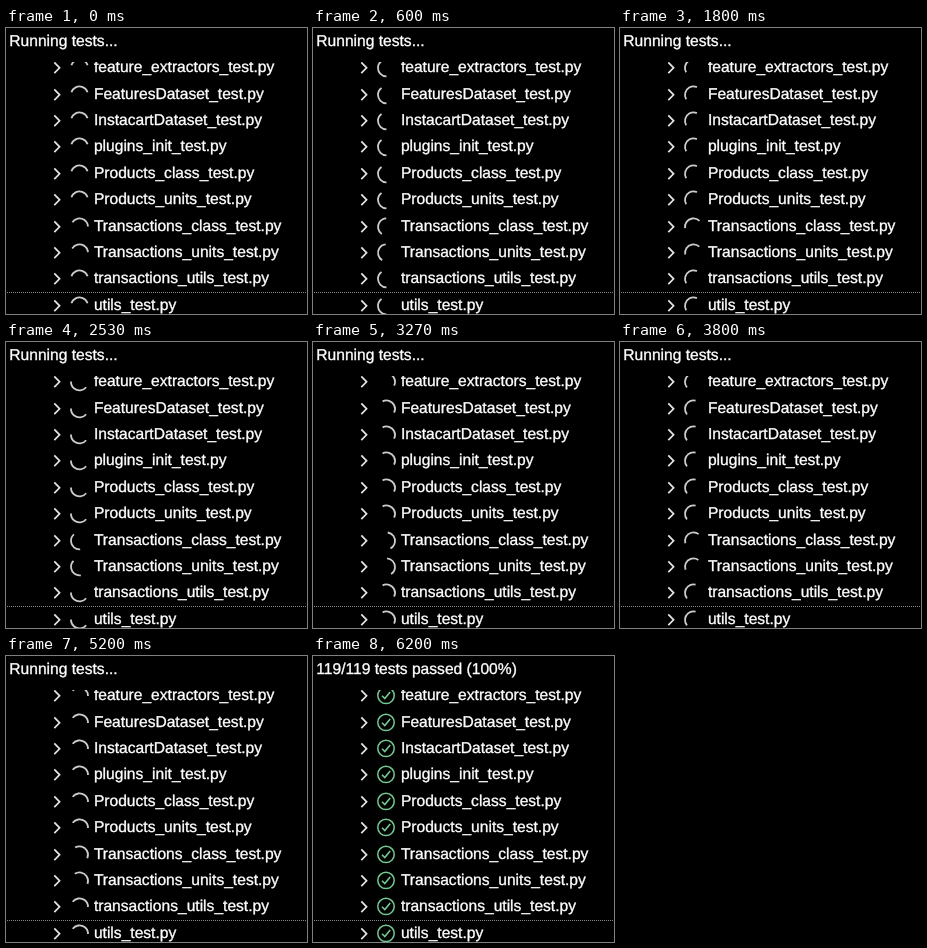
These frames come from a looping animation (301 by 286 pixels, 7.07 s). An HTML page with a canvas:

```html
<!DOCTYPE html>
<html lang="en">
<meta charset="utf-8">
<title>Test run</title>
<style>
  html, body { margin: 0; height: 100%; overflow: hidden; background: #000; }
  canvas { display: block; }
</style>
<canvas id="stage" width="301" height="286"></canvas>
<script>
const ctx = document.getElementById('stage').getContext('2d');
const LOOP = 7070, DONE = 6200, TICK = 1000 / 15, SPIN = 1018;
const ROW = 26.4, FIRST_BASELINE = 44.2, LIST_TOP = 34, ICON_X = 73.5;
const files = [
  'feature_extractors', 'FeaturesDataset', 'InstacartDataset', 'plugins_init',
  'Products_class', 'Products_units', 'Transactions_class', 'Transactions_units',
  'transactions_utils', 'utils'
];
// Two spinners run slightly ahead of the others, in turns.
const lead = { Transactions_class: 0.09, Transactions_units: 0.08 };

const bezier = (s, a, b) => 3 * (1 - s) ** 2 * s * a + 3 * (1 - s) * s * s * b + s ** 3;

// cubic-bezier(.53, .21, .29, .67), solved by bisection
function ease(x) {
  let lo = 0, hi = 1;
  for (let i = 0; i < 24; i++) {
    const mid = (lo + hi) / 2;
    if (bezier(mid, 0.53, 0.29) < x) lo = mid; else hi = mid;
  }
  return bezier(lo, 0.21, 0.67);
}

function polyline(color, width, ...points) {
  ctx.strokeStyle = color;
  ctx.lineWidth = width;
  ctx.beginPath();
  points.forEach(([x, y]) => ctx.lineTo(x, y));
  ctx.stroke();
}

function arc(color, width, x, y, radius, from, to) {
  ctx.strokeStyle = color;
  ctx.lineWidth = width;
  ctx.beginPath();
  ctx.arc(x, y, radius, from, to);
  ctx.stroke();
}

// A hairline outline gives the text its slightly heavy weight.
function label(text, x, y) {
  ctx.fillStyle = ctx.strokeStyle = '#fff';
  ctx.lineWidth = 0.35;
  ctx.fillText(text, x, y);
  ctx.strokeText(text, x, y);
}

function spinner(y, turns) {
  const middle = ease(turns % 1) * 2 * Math.PI - Math.PI / 2;
  const half = 72 * Math.PI / 180;
  arc('#ccc', 1.8, ICON_X, y + 0.5, 8.5, middle - half, middle + half);
}

function check(y) {
  const x = ICON_X - 0.5;
  arc('#73c991', 1.5, x, y, 8.2, 0, 2 * Math.PI);
  polyline('#73c991', 1.6, [x - 4, y + 0.4], [x - 1.2, y + 3.2], [x + 4.2, y - 3.4]);
}

function draw(ms) {
  const done = ms >= DONE;
  const time = Math.floor((ms + 3.4) / TICK) * TICK;
  ctx.fillStyle = '#000';
  ctx.fillRect(0, 0, 301, 286);
  ctx.font = '15.6px "Liberation Sans", Arial, sans-serif';
  ctx.textRendering = 'geometricPrecision';
  label(done ? '119/119 tests passed (100%)' : 'Running tests...', 3.3, 18);

  ctx.save();
  ctx.beginPath();
  ctx.rect(0, LIST_TOP, 301, 286 - LIST_TOP);
  ctx.clip();
  files.forEach((name, i) => {
    const baseline = Math.round(FIRST_BASELINE + i * ROW);
    const y = baseline - 4.6;
    polyline('#e4e4e4', 1.7, [48.3, y - 5], [53.6, y + 0.4], [48.3, y + 5.8]);
    if (done) check(y);
    else spinner(y, time / SPIN + (lead[name] || 0));
    label(name + '_test.py', 87.9, baseline);
  });
  ctx.restore();

  ctx.setLineDash([1, 1]);
  ctx.lineDashOffset = 1;
  polyline('#888', 1, [0, 264.5], [301, 264.5]);
  ctx.setLineDash([]);
}

function frame() {
  draw(performance.now() % LOOP);
  requestAnimationFrame(frame);
}
frame();
</script>
</html>
```
